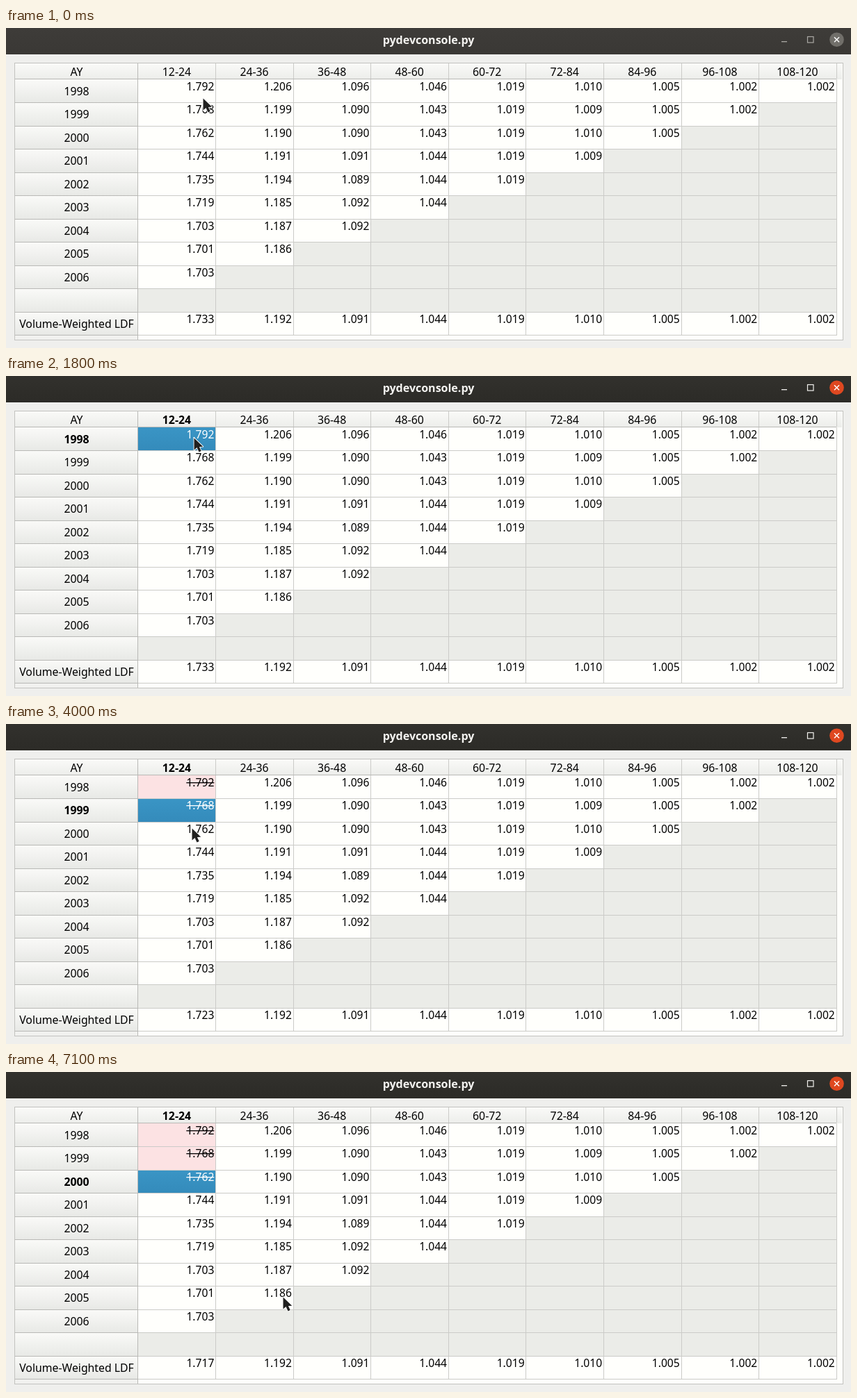
Write an HTML page with a canvas that moves like this. It is 1215 px wide and 461 px high and loops after 8000 ms.

```html
<!DOCTYPE html>
<html lang="en">
<head>
<meta charset="utf-8">
<title>pydevconsole.py</title>
<style>
html, body { margin: 0; width: 100%; height: 100%; overflow: hidden; background: #efefed; }
canvas { display: block; }
</style>
</head>
<body>
<canvas width="1215" height="461"></canvas>
<script>
const ctx = document.querySelector('canvas').getContext('2d');
const LOOP = 8000, STEP = 100, ROWS = 11, COLS = 9;
const LEFT = 189.65, TOP = 74, COL_W = 111.56, ROW_H = 33.48;
const FACE = 'px Ubuntu, "Noto Sans", "Open Sans", sans-serif';
const GRID = '#cbcbc8', EDGE = '#b9b9b6';

// Cell text after "1.": one column per line, the average last
const columns = `792 768 762 744 735 719 703 701 703 733
206 199 190 191 194 185 187 186 192
096 090 090 091 089 092 092 091
046 043 043 044 044 044 044
019 019 019 019 019 019
010 009 010 009 010
005 005 005 005
002 002 002
002 002`.split('\n').map(line => line.split(' '));

const selectAt = [1800, 3100, 5100];
const strikeAt = [2000, 3400, 5300];
const averages = ['733', '728', '723', '717'];

// Each move bends from the last resting point, past a control point, to its end
const rest = [283, 101];
const moves = [
  { start: 400, steps: 9, bend: [315, 519], end: [270, 89] },
  { start: 2600, steps: 3, bend: [268, 105], end: [267, 121] },
  { start: 3700, steps: 4, bend: [267, 136], end: [267, 150] },
  { start: 6100, steps: 9, bend: [470, 188], end: [415, 301] },
  { start: 7000, steps: 2, bend: [406, 313], end: [398, 324] }
];

const colX = c => Math.round(LEFT + c * COL_W);
const rowY = r => Math.round(TOP + r * ROW_H);
const countPast = (times, t) => times.filter(at => t >= at).length;

function box(x, y, w, h, fill) {
  ctx.fillStyle = fill;
  ctx.fillRect(x, y, w, h);
}

function shade(y, h, from, to) {
  const g = ctx.createLinearGradient(0, y, 0, y + h);
  g.addColorStop(0, from);
  g.addColorStop(1, to);
  return g;
}

function label(text, x, y, { align = 'center', bold = false, size = 15.8, color = '#000' } = {}) {
  ctx.font = (bold ? 'bold ' : '') + size + FACE;
  ctx.textAlign = align;
  ctx.fillStyle = color;
  ctx.fillText(text, x, y);
}

function path(points) {
  ctx.beginPath();
  points.forEach(([x, y]) => ctx.lineTo(x, y));
}

function titleBar(active) {
  box(0, 0, 1215, 38, active ? shade(0, 38, '#32312d', '#2c2b27') : shade(0, 38, '#3e3c39', '#3a3835'));
  label('pydevconsole.py', 607.5, 23, { bold: true, size: 16, color: '#f4f3f0' });
  const icon = active ? '#f1f0ed' : '#aaa8a4';
  box(1115, 19, 8, 1.3, icon);
  ctx.strokeStyle = icon;
  ctx.lineWidth = 1.2;
  ctx.strokeRect(1152.5, 12.5, 8.5, 8.5);
  ctx.beginPath();
  ctx.arc(1194.5, 16.7, 10.3, 0, 7);
  ctx.fillStyle = active ? '#df4820' : '#716f6a';
  ctx.fill();
  ctx.strokeStyle = '#fff';
  ctx.lineWidth = 1.5;
  for (const d of [-3.5, 3.5]) {
    path([[1191, 16.7 - d], [1198, 16.7 + d]]);
    ctx.stroke();
  }
}

function headers(selected) {
  box(13, 51, 1189, 23, shade(51, 23, '#fafaf8', '#ecedea'));
  box(13, 73, 1181, 1, EDGE);
  label('AY', 101.5, 68.5);
  for (let c = 0; c < COLS; c++) {
    const start = 12 * (c + 1);
    box(colX(c + 1), 51, 1, 22, GRID);
    label(`${start}-${start + 12}`, LEFT + (c + 0.5) * COL_W, 68.5, { bold: selected >= 0 && c === 0 });
  }
  box(13, 443, 177, 6, '#f1f1ef');
  for (let r = 0; r < ROWS; r++) {
    const y = rowY(r), h = rowY(r + 1) - y;
    const text = r < COLS ? 1998 + r : r === ROWS - 1 ? 'Volume-Weighted LDF' : '';
    box(13, y, 177, h, shade(y, h, '#fafaf8', '#e8e9e6'));
    label(text, 101.5, y + 23, { bold: r === selected });
  }
  for (let r = 1; r <= ROWS; r++) box(13, rowY(r), 177, 1, EDGE);
  box(189, 51, 1, 398, EDGE);
}

function cellText(r, c, struck) {
  if (r < COLS - c) return columns[c][r];
  if (r === ROWS - 1) return c ? columns[c].at(-1) : averages[struck];
}

function cells(selected, struck) {
  for (let r = 0; r < ROWS; r++) {
    const y = rowY(r), h = rowY(r + 1) - y;
    for (let c = 0; c < COLS; c++) {
      const x = colX(c), w = colX(c + 1) - x;
      const isSelected = c === 0 && r === selected;
      const isStruck = c === 0 && r < struck;
      const value = cellText(r, c, struck);
      box(x, y, w, h, isSelected ? shade(y, h, '#3a95c5', '#348bbb')
        : isStruck ? '#fce2e3' : value ? '#fffffc' : '#ebece8');
      if (!value) continue;
      const color = isSelected ? '#fff' : '#000';
      const right = LEFT + (c + 1) * COL_W - 1.9;
      label('1.' + value, right, y + 16, { align: 'right', size: 15.6, color });
      if (isStruck) box(right - 40, y + 10, 40, 1.3, color);
    }
  }
  for (let r = 1; r <= ROWS; r++) box(190, rowY(r), 1005, 1, GRID);
  for (let c = 1; c <= COLS; c++) box(colX(c), TOP, 1, 369, GRID);
}

function pointerTip(t) {
  let from = rest;
  for (const { start, steps, bend, end } of moves) {
    if (t < start) break;
    const done = Math.min(1, (Math.floor((t - start) / STEP) + 1) / steps);
    const u = done ** 1.35, v = 1 - u;
    from = from.map((p, i) => v * v * p + 2 * u * v * bend[i] + u * u * end[i]);
  }
  return from.map(Math.round);
}

function pointer(t) {
  const [x, y] = pointerTip(t);
  ctx.save();
  ctx.translate(x + 0.5, y + 0.5);
  path([[0, 0], [0, 17], [4, 13.5], [7, 20], [10.2, 18.6], [7.4, 12.5], [12.7, 12.2]]);
  ctx.closePath();
  ctx.lineJoin = 'round';
  ctx.strokeStyle = '#fff';
  ctx.lineWidth = 1.8;
  ctx.stroke();
  ctx.fillStyle = '#20201f';
  ctx.fill();
  ctx.restore();
}

function draw(now) {
  const t = now % LOOP;
  const selected = countPast(selectAt, t) - 1;
  const struck = countPast(strikeAt, t);
  box(0, 0, 1215, 461, '#efefed');
  titleBar(selected >= 0);
  box(12, 50, 1192, 400, '#c2c2bf');
  box(13, 51, 1190, 398, '#fefefb');
  cells(selected, struck);
  headers(selected);
  pointer(t);
  requestAnimationFrame(draw);
}
requestAnimationFrame(draw);
</script>
</body>
</html>
```
